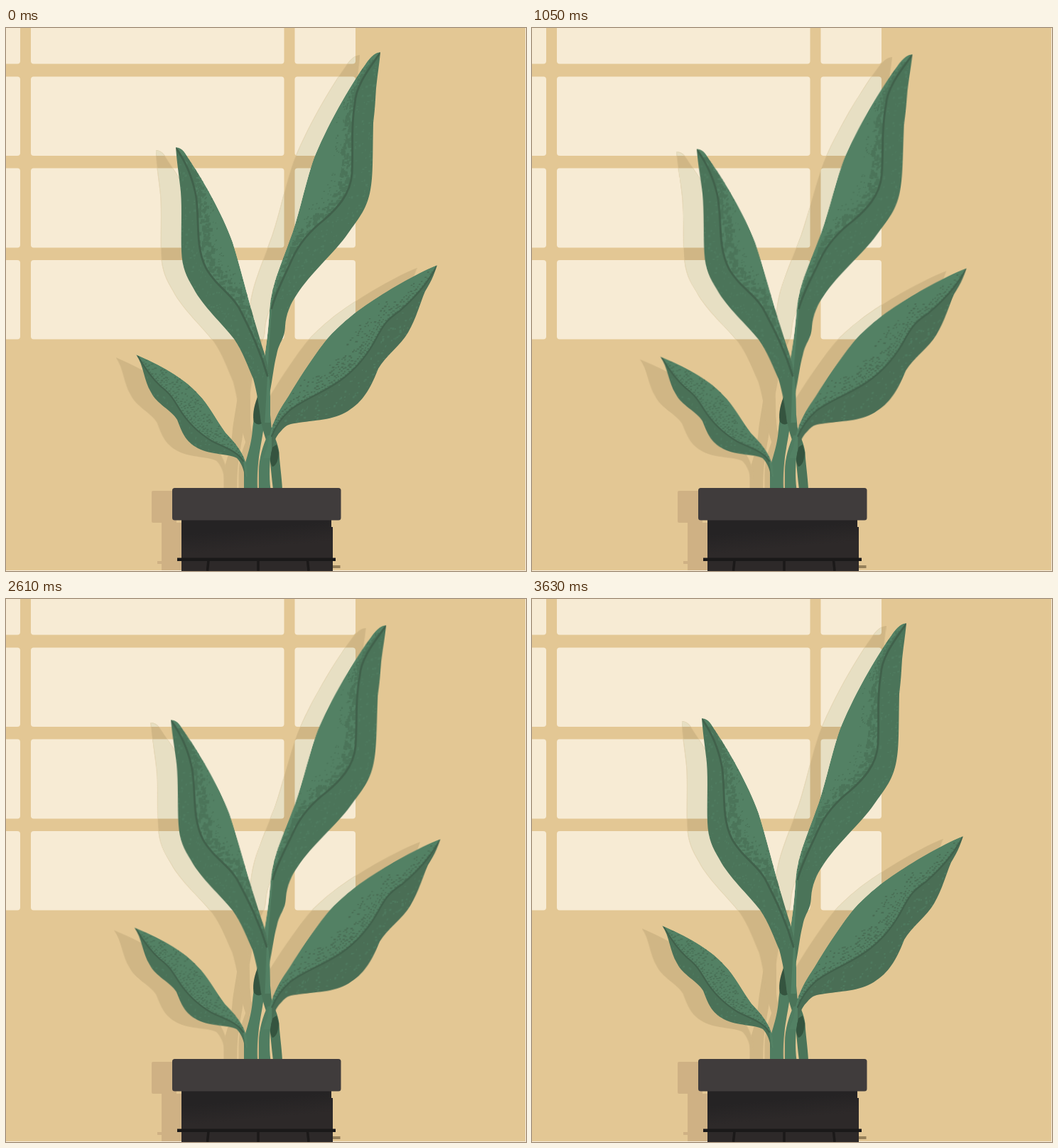
These frames come from a looping animation (732x765 px, 4.53 s). An HTML page:

```html
<!DOCTYPE html>
<html lang="en">
<head>
<meta charset="utf-8">
<title>Potted plant</title>
<style>
  html, body { margin: 0; width: 100%; height: 100%; overflow: hidden; background: #f6ecda; }
  svg { display: block; width: 732px; height: 765px; }
</style>
</head>
<body>
<svg id="stage" viewBox="0 0 732 765" width="732" height="765">
  <defs>
    <linearGradient id="body" x1="0" y1="0" x2=".25" y2="1">
      <stop offset=".3" stop-color="#252324"/>
      <stop offset=".65" stop-color="#2d2929"/>
    </linearGradient>
    <clipPath id="panes"></clipPath>
  </defs>
  <rect width="731" height="764" fill="#e3c794"/>
  <g id="window" fill="#f7ebd4"></g>
  <g id="wallShade" fill="#d0b685"></g>
  <g clip-path="url(#panes)"><g id="paneShade" fill="#e7dfc3"></g></g>
  <path fill="#cfb184" d="M207 652H240V697H207Q205 697 205 695V654Q205 652 207 652ZM219 697H250V764H219V755H213V751H219Z"/>
  <g id="plant"></g>
  <rect x="459" y="757" width="11.500" height="4" fill="#96805a"/>
  <path fill="url(#body)" d="M247 690H458V703H460V765H247Z"/>
  <rect x="234" y="648" width="237.500" height="45.500" rx="3.500" fill="#403c3c"/>
  <path fill="#1a1919" d="M241 746.500H464V751H241Z"/>
  <path fill="none" stroke="#1b1919" stroke-width="3.500" d="M285 750L283.500 765M355 750V765M424.500 750L426 765"/>
</svg>
<script>
const $ = id => document.getElementById(id);
const LIGHT = '#538164', DARK = '#4b7459', VEIN = '#41614b', DEEP = '#35543f';
const LOOP = 4530, PEAK = 1815;

function add(parent, tag, attrs = {}) {
  const el = document.createElementNS('http://www.w3.org/2000/svg', tag);
  for (const k in attrs) el.setAttribute(k, attrs[k]);
  return parent.appendChild(el);
}

function seeded(s) {
  return () => (s = (s * 16807) % 2147483647) / 2147483647;
}

// Window light
for (const [x, w] of [[-20, 40], [35, 356.5], [406.5, 85.5]])
  for (const [y, h] of [[-20, 70.5], [68.5, 111.5], [197.5, 112], [327, 111.5]])
    for (const id of ['window', 'panes'])
      add($(id), 'rect', { x, y, width: w, height: h, rx: 4 });

// side: +1 when the lit half lies to the right of the vein, walking from the tip
const leaves = {
  tallRight: {
    pivot: [372, 480], turn: 1.77, side: 1, dark: DARK,
    shape: 'M527 34C518 34 510 45 506 51C478 90 443 156 431 191C419 228 411 270 399 300C384 342 374 362 371 398C369 430 366 450 363 470L362 500L371 516C376 490 377 475 381 460C385 440 392 440 393 420C394 404 400 389 409 376C428 346 463 316 481 290C498 266 508 255 513 228C517 208 516 180 517 134C520 110 520 100 521 85C523 65 525 55 527 34Z',
    vein: 'M526 36C505 65 492 85 491 107C485 140 489 170 487 205C485 235 465 255 448 270C425 288 412 305 403 325C392 350 380 372 374 395',
    far: 'L366 520H600V30Z'
  },
  tallLeft: {
    pivot: [361, 548], turn: -1.75, side: -1, dark: DARK,
    shape: 'M239 168C249 168 253 178 257 184C275 210 305 262 319 302C331 340 345 400 364 459C370 478 372 500 372 520V556H359C356 530 353 512 348 494C341 478 333 455 321 438C306 418 277 392 264 367C254 350 248 338 247 315C246 290 248 255 246 231C244 210 241 195 239 168Z',
    vein: 'M240 170C254 190 262 210 267 234C271 255 269 280 272 305C276 335 285 345 296 358C312 375 325 385 332 402C345 428 358 455 368 490',
    far: 'L364 560H200V160Z'
  },
  lowRight: {
    pivot: [372, 600], turn: 1.68, side: 1, hatch: true, dark: '#4a6e55',
    shape: 'M607 334C575 347 535 371 507 390C485 405 460 427 448 443C428 469 410 498 398 518C385 538 373 555 368 590L362 606H372C375 590 377 578 387 568C395 558 400 558 412 556C440 552 465 552 485 537C505 524 515 503 524 480C534 462 556 447 566 429C578 408 582 390 590 371C598 358 601 352 607 334Z',
    vein: 'M606 336C592 362 575 380 555 398C535 412 532 418 524 432C510 460 490 483 470 497C445 515 415 525 398 540C385 552 378 565 374 575',
    far: 'L374 610H620V330Z'
  },
  lowLeft: {
    pivot: [335, 620], turn: -1.6, side: -1, hatch: true, dark: '#4a7157',
    shape: 'M183 460C215 474 250 492 271 516C285 530 296 552 309 570C322 584 335 598 339 618L340 632H336C335 622 331 612 325 606C312 599 290 602 270 592C252 582 248 570 241 552C233 538 212 530 204 513C194 497 194 475 183 460Z',
    vein: 'M186 463C196 480 206 494 218 505C232 516 235 522 243 535C255 555 270 570 290 582C310 592 325 596 334 610',
    far: 'L338 640H170V455Z'
  }
};

const stems = {
  left: 'M354 518C352 535 348 552 347 567C344 598 335 610 335 628V650H354C353 630 355 608 358 592C361 575 363 565 365 540Z',
  mid: 'M368 574C362 588 356 605 356 625V650H372.500C370 632 371 610 374 590L378 574Z',
  right: 'M358 545C360 565 366 580 371 595C372 615 374 632 376 650H389C388 630 385 612 384.500 598C383 585 377 575 373.500 562L372 545Z'
};

function sway(el, { pivot: [x, y], turn }) {
  const easing = 'cubic-bezier(.364,0,.636,1)';
  const rest = 'rotate(0deg)', bent = `rotate(${turn}deg)`;
  el.style.transformOrigin = `${x}px ${y}px`;
  el.animate([
    { transform: rest, offset: 0, easing },
    { transform: bent, offset: PEAK / LOOP, easing },
    { transform: rest, offset: 2 * PEAK / LOOP },
    { transform: rest, offset: 1 }
  ], { duration: LOOP, iterations: Infinity });
}

function shade(parent) {
  const g = add(parent, 'g', { transform: 'translate(-28.500 4)' });
  for (const d of Object.values(stems)) add(g, 'path', { d });
  for (const leaf of Object.values(leaves)) sway(add(g, 'path', { d: leaf.shape }), leaf);
}

// Grain along the vein: dark flecks on the lit half, light flecks on the other
function grain(vein, leaf, rnd) {
  const len = vein.getTotalLength();
  const out = { dark: '', light: '' };
  const fleck = (kind, s, off, w, h) => {
    const p = vein.getPointAtLength(s), q = vein.getPointAtLength(Math.min(s + 2, len));
    const dx = q.x - p.x, dy = q.y - p.y, d = Math.hypot(dx, dy) || 1;
    const x = p.x - dy / d * off * leaf.side, y = p.y + dx / d * off * leaf.side;
    out[kind] += `M${x.toFixed(1)} ${y.toFixed(1)}h${w.toFixed(1)}l-.6 ${h.toFixed(1)}h${(-w).toFixed(1)}z`;
  };
  const belly = s => Math.sin(Math.PI * s / len);
  if (leaf.hatch) {
    for (let s = 8; s < len - 4; s += 4.2)
      for (let off = 2; off < 34; off += 4) {
        const reach = 4 + 28 * belly(s);
        if (rnd() < 1.15 - off / reach)
          fleck('dark', s + rnd() * 2, off + rnd() * 1.5, 1.5 + rnd() * 2.2, 1.2 + rnd() * 1.2);
      }
  } else {
    for (let s = 12; s < len - 6; s += 1.3) {
      const reach = 3 + 20 * belly(s);
      fleck('dark', s, reach * rnd() * .75, 2 + rnd() * 4, 2 + rnd() * 4);
      if (rnd() < .5) fleck('dark', s, reach * (.5 + rnd() * .8), 1 + rnd() * 1.5, 1 + rnd() * 1.5);
    }
  }
  for (let s = 8; s < len; s += 2.2)
    fleck('light', s, -3 - rnd() * 28, 1 + rnd() * 2.5, 1 + rnd() * 2.5);
  return out;
}

function drawLeaf(name, seed) {
  const leaf = leaves[name];
  const g = add($('plant'), 'g');
  add(add(g, 'clipPath', { id: name }), 'path', { d: leaf.shape });
  const inner = add(g, 'g', { 'clip-path': `url(#${name})` });
  add(inner, 'path', { d: leaf.shape, fill: LIGHT });
  add(inner, 'path', { d: leaf.vein + leaf.far, fill: leaf.dark });
  const vein = add(inner, 'path', {
    d: leaf.vein, fill: 'none', stroke: VEIN, 'stroke-width': leaf.hatch ? 2.2 : 2.8, 'stroke-linecap': 'round'
  });
  const flecks = grain(vein, leaf, seeded(seed));
  inner.insertBefore(add(inner, 'path', { d: flecks.dark, fill: leaf.dark }), vein);
  inner.insertBefore(add(inner, 'path', { d: flecks.light, fill: LIGHT, opacity: .6 }), vein);
  sway(g, leaf);
}

function drawStem(name, fill, hollow) {
  add($('plant'), 'path', { d: stems[name], fill });
  if (hollow) add($('plant'), 'path', { d: hollow, fill: DEEP });
}

shade($('wallShade'));
shade($('paneShade'));

drawStem('left', '#507d61', 'M354 520C348 535 347 548 349 555C354 560 358 559 361 556L362 535Z');
drawLeaf('tallRight', 71);
drawStem('right', DARK, 'M371 593C371 606 372 614 375 618C381 617 384 606 384 598L381 587Z');
drawLeaf('tallLeft', 305);
drawStem('mid', '#507d61');
drawLeaf('lowRight', 911);
drawLeaf('lowLeft', 1207);
</script>
</body>
</html>
```
